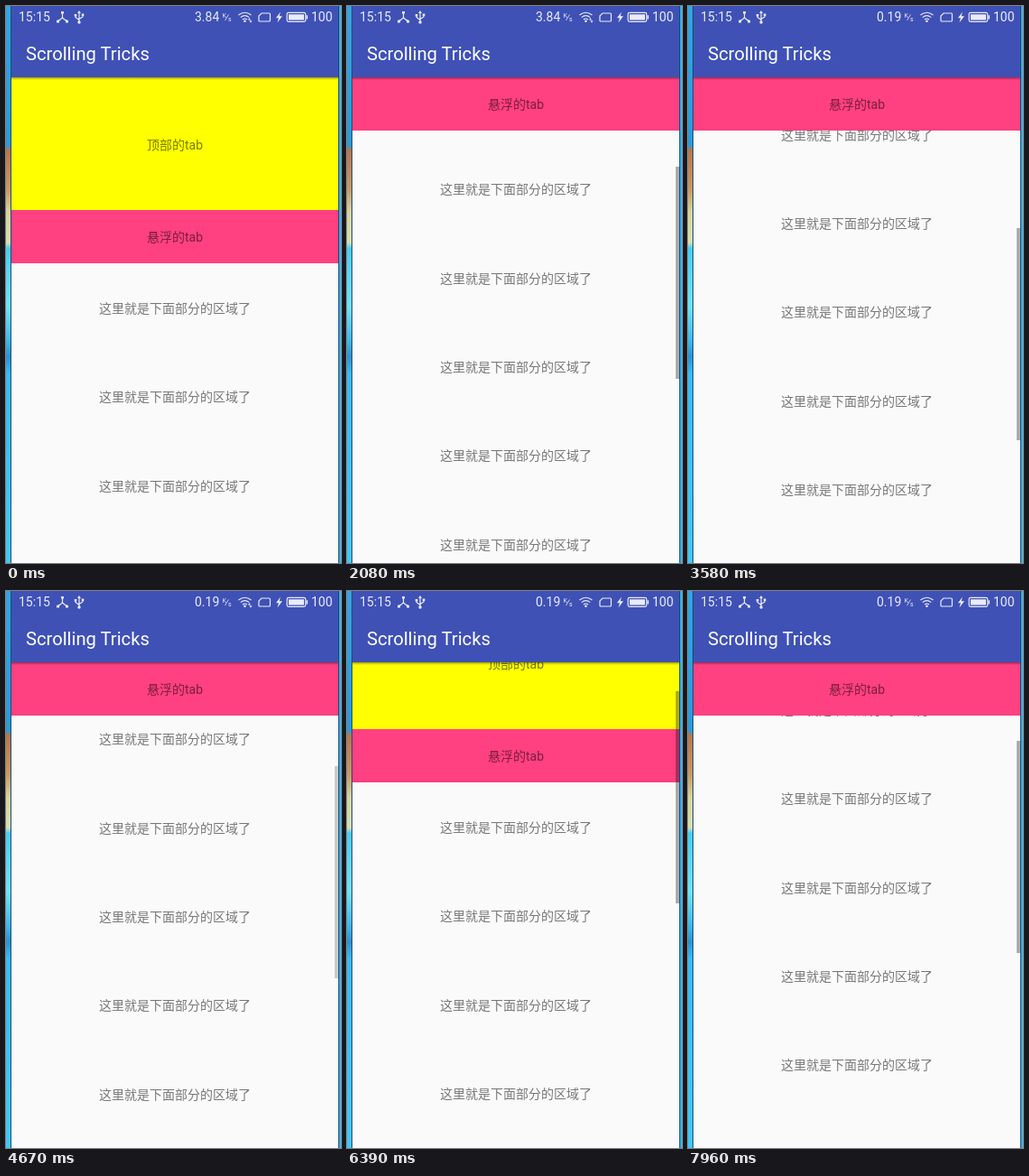
Recreate the animation shown at these times as an HTML page. Size 371 px wide and 617 px high, loop 8 s.

```html
<!DOCTYPE html>
<html lang="zh-CN">
<head>
<meta charset="utf-8">
<title>Scrolling list</title>
<style>
  html, body { margin: 0; width: 100%; height: 100%; overflow: hidden; background: #fafafa; }
  svg { display: block; width: 371px; height: 617px; }
  text { font: 14px Roboto, "Noto Sans CJK SC", "Noto Sans CJK", sans-serif; }
  .body text { fill: #000; fill-opacity: .52; text-anchor: middle; }
  .status { fill: none; stroke: #e9ebf8; stroke-width: 1.2; }
  .status text, .solid { fill: #e9ebf8; stroke: none; }
  .status .unit { font-size: 7px; }
  .title { font-size: 20.2px; fill: #fff; }
</style>
</head>
<body>
<svg viewBox="0 0 371 617">
  <defs>
    <linearGradient id="wall" x2="0" y2="1">
      <stop offset="0" stop-color="#35a5e2"/>
      <stop offset=".25" stop-color="#2a9ad8"/>
      <stop offset=".26" stop-color="#b8764f"/>
      <stop offset=".33" stop-color="#c79a66"/>
      <stop offset=".37" stop-color="#d6d3a0"/>
      <stop offset=".425" stop-color="#d5dfb4"/>
      <stop offset=".435" stop-color="#48cdf4"/>
      <stop offset=".54" stop-color="#6fe3fa"/>
      <stop offset=".6" stop-color="#3fb9ea"/>
      <stop offset=".63" stop-color="#2b93d3"/>
      <stop offset=".66" stop-color="#37bcf3"/>
      <stop offset="1" stop-color="#42c8f7"/>
    </linearGradient>
    <linearGradient id="shade" x2="0" y2="1">
      <stop offset="0" stop-opacity=".36"/>
      <stop offset="1" stop-opacity="0"/>
    </linearGradient>
    <clipPath id="view"><path d="M6 79H368V617H6z"/></clipPath>
  </defs>

  <rect width="371" height="617" fill="#fafafa"/>
  <g class="body" clip-path="url(#view)">
    <g id="list">
      <rect x="6" y="79" width="362" height="147" fill="#ff0"/>
      <text x="187" y="159">顶部的tab</text>
    </g>
    <g id="tab">
      <rect x="6" width="362" height="59" fill="#ff4081"/>
      <text x="187" y="35">悬浮的tab</text>
    </g>
    <rect id="thumb" x="364" width="4" height="235" fill-opacity=".32"/>
    <rect x="6" y="79" width="362" height="3" fill="url(#shade)"/>
  </g>

  <rect x="5" width="363" height="79" fill="#3f51b5"/>
  <text class="title" x="22" y="60">Scrolling Tricks</text>

  <g class="status">
    <text x="14" y="17">15:15</text>
    <path d="M62.5 7V13L57 17.5M62.5 13L68 17.5"/>
    <path class="solid" d="M61 6h3v2.6h-3zM56 16l3-1v3.5h-3zM69 16l-3-1v3.5h3z"/>
    <path d="M81 7V18M77 10V12.5L81 15.5M85 9.5V12L81 14.5"/>
    <path class="solid" d="M81 5l2 3h-4zM75.7 9h2.6v2.6h-2.6zM83.7 8.5h2.6v2.6h-2.6z"/>
    <circle class="solid" cx="81" cy="18" r="1.7"/>
    <text id="speed" x="209" y="17">3.84</text>
    <text class="unit" x="239.5" y="12.5">K</text>
    <path stroke-width=".8" d="M242.5 16L246.5 9.5"/>
    <text class="unit" x="246" y="17">s</text>
    <path d="M257.5 10Q264.5 4.5 271.5 10M259.8 12.6Q264.5 8.8 269.2 12.6M262 15Q264.5 13 267 15"/>
    <circle class="solid" cx="264.5" cy="16.8" r="1.3"/>
    <path id="arrows" class="solid" d="M268 15.5l1.5-2.5 1.5 2.5zM269.5 16.2h3l-1.5 2.6z"/>
    <path d="M283 8H291.5Q292.5 8 292.5 9V16Q292.5 17 291.5 17H281Q280 17 280 16V11z"/>
    <path class="solid" d="M304 6.5L299 13.2H302L300.5 18.5L306 11.3H302.7z"/>
    <rect x="311.2" y="7.4" width="20.6" height="10" rx="1.8"/>
    <path class="solid" d="M313 9.2h17v6.4h-17zM332.5 10.3h1.6v4.2h-1.6z"/>
    <text x="338" y="17">100</text>
  </g>

  <rect width="5" height="617" fill="url(#wall)"/>
  <rect x="5" width="1" height="617" fill="#1d4a70"/>
  <rect x="368" width="1" height="617" fill="#164a78"/>
  <rect x="369" width="2" height="617" fill="#3db4ea"/>
</svg>
<script>
const LOOP = 8000, ROW = 98.3, ROWS = 11, TOP = 79;
const $ = id => document.getElementById(id);

// Bursts of screen updates: first, last, count.
const bursts = [
  [830, 1780, 8], [1930, 2080, 2], [2350, 3310, 8], [3430, 4400, 8],
  [4550, 5570, 9], [5690, 6640, 8], [6790, 7720, 8], [7840, 7960, 2]
];
const ticks = [0];
for (const [a, b, n] of bursts)
  for (let i = 0; i < n; i++) ticks.push(a + (b - a) * i / (n - 1));

const scrollKeys = [
  [0, 0], [720, 0], [2080, 230], [2600, 230], [3569, 389],
  [4380, 269], [4700, 269], [5826, 100], [6200, 60],
  [6923, 152], [7960, 203]
];
const barKeys = [
  [0, 0], [829, 0], [830, 1], [2350, 1], [2600, .6], [2720, 1],
  [4400, 1], [4550, .6], [4680, .6], [4800, 1]
];
const smooth = u => u * u * (3 - 2 * u);

function valueAt(keys, t, ease = u => u) {
  const i = keys.findIndex(k => k[0] > t);
  if (i < 0) return keys[keys.length - 1][1];
  const [t0, v0] = keys[i - 1], [t1, v1] = keys[i];
  return v0 + (v1 - v0) * ease((t - t0) / (t1 - t0));
}

for (let i = 0; i < ROWS; i++) {
  const row = document.createElementNS($('list').namespaceURI, 'text');
  row.setAttribute('x', 187);
  row.setAttribute('y', Math.round(340 + ROW * i));
  row.textContent = '这里就是下面部分的区域了';
  $('list').append(row);
}

function draw(now) {
  const time = now % LOOP;
  const t = ticks.filter(tick => tick <= time + .5).pop();
  const y = Math.round(valueAt(scrollKeys, t, smooth));
  $('list').setAttribute('transform', `translate(0 ${-y})`);
  $('tab').setAttribute('transform', `translate(0 ${Math.max(TOP, 226 - y)})`);
  $('thumb').setAttribute('y', Math.round(TOP + .5 + y * .427));
  $('thumb').setAttribute('opacity', valueAt(barKeys, t));
  $('speed').textContent = t < 2900 ? '3.84' : '0.19';
  const busy = t < 2900 || (t > 4400 && t < 6300);
  $('arrows').setAttribute('visibility', busy ? 'visible' : 'hidden');
}

const start = performance.now();
function frame() {
  draw(performance.now() - start);
  requestAnimationFrame(frame);
}
frame();
</script>
</body>
</html>
```
